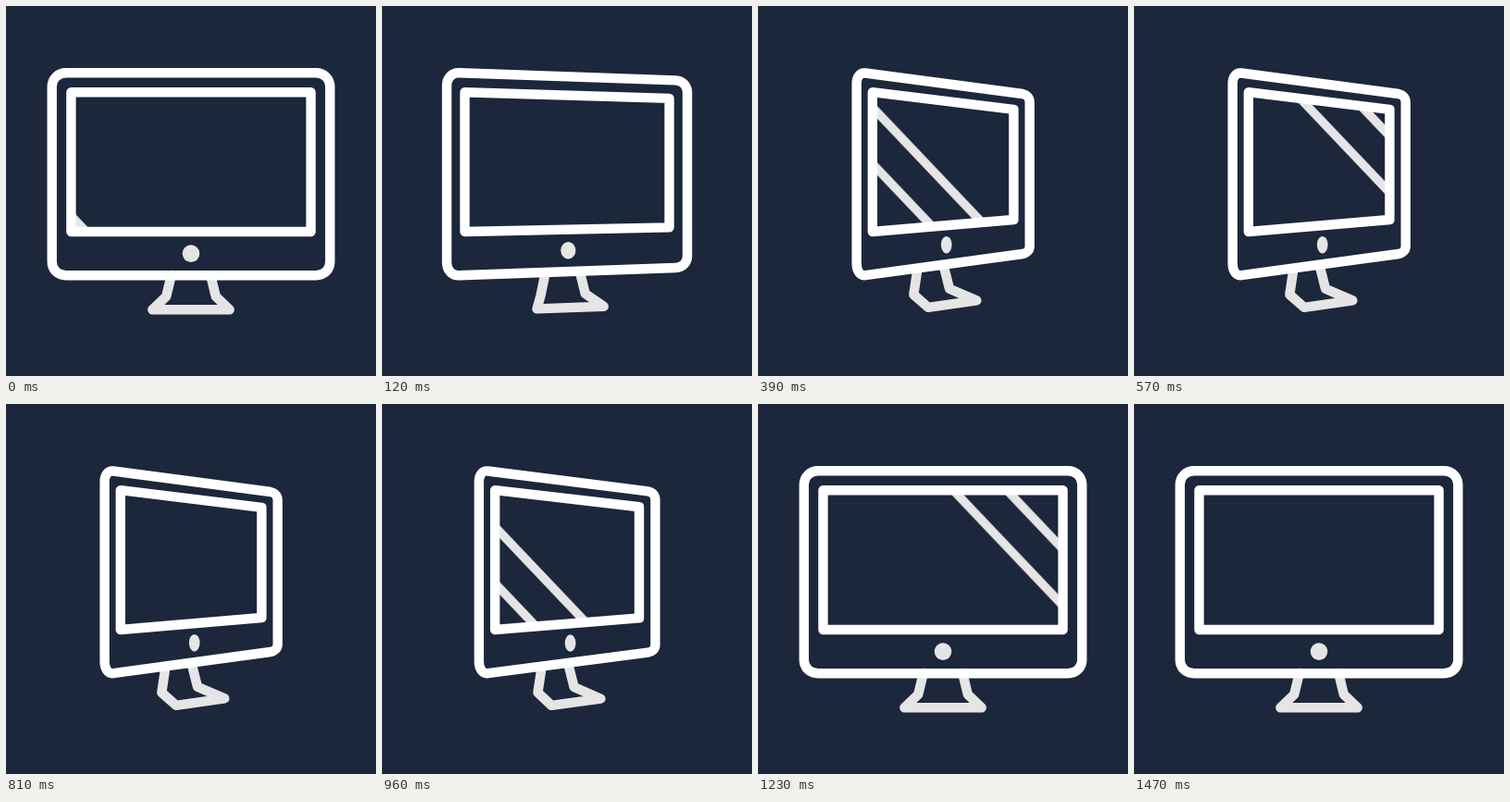
An HTML page that plays this animation: 400x400 px, repeating every 1.62 s.

```html
<!DOCTYPE html>
<html lang="en">
<head>
<meta charset="utf-8">
<title>Turning monitor</title>
<style>
  html, body { margin: 0; width: 100%; height: 100%; overflow: hidden; background: #1c273b; }
  svg { display: block; width: 100%; height: 100%; }

  .morph { d: var(--front); animation: turn 1620ms infinite; }
  .line { fill: none; stroke-width: 10.4; stroke-linejoin: round; stroke-linecap: round; }
  .white { stroke: #fff; }
  .grey { stroke: #e5e5e5; }
  .dot { fill: #e5e5e5; }
  .glare { stroke-width: 9.5; animation: sweep 1620ms linear infinite; }

  .case {
    --front: path("M49.7 87 C49.7 79 56 72.2 65 72.2 L335 72.2 C344 72.2 350.3 79 350.3 87 L350.3 276.5 C350.3 285 344 291.3 335 291.3 L65 291.3 C56 291.3 49.7 285 49.7 276.5 Z");
    --side: path("M106.6 84 C106.6 77 110 71.7 116 72.5 L286 95 C290.5 95.8 293.7 99.5 293.7 104 L293.7 260 C293.7 264 290.5 267.3 286 268 L116 291.2 C110 291.8 106.6 286 106.6 278.5 Z");
  }
  .screen {
    --front: path("M70.4 93.2 L329.6 93.2 L329.6 244 L70.4 244 Z");
    --side: path("M123.8 93.2 L276.4 111.8 L276.4 231 L123.8 244 Z");
  }
  .stand {
    --front: path("M178.8 291 L173.2 314 L158.3 328.3 L241.7 328.3 L226.8 314 L221.2 291");
    --side: path("M172 287 L168.3 312 L184 325.8 L236.3 318.4 L207 305.8 L201.5 284");
  }
  .dot {
    --front: path("M190.7 267.6 a9.3 9.3 0 1 0 18.6 0 a9.3 9.3 0 1 0 -18.6 0 Z");
    --side: path("M197.9 258.2 a5.8 9.3 0 1 0 11.6 0 a5.8 9.3 0 1 0 -11.6 0 Z");
  }

  @keyframes turn {
    0% { d: var(--front); animation-timing-function: cubic-bezier(.33, 0, .67, 1); }
    18.52% { d: var(--side); animation-timing-function: linear; }
    57.78% { d: var(--side); animation-timing-function: cubic-bezier(.33, 0, .67, 1); }
    72.59%, 100% { d: var(--front); }
  }
  /* two passes of the glare, left to right */
  @keyframes sweep {
    0%, 9.26% { transform: translateX(-52px); }
    46.91% { transform: translateX(365px); }
    46.92%, 49.38% { transform: translateX(-21px); }
    90.74%, 100% { transform: translateX(437px); }
  }
</style>
</head>
<body>
<svg viewBox="0 0 400 400">
  <clipPath id="glass"><path class="morph screen"/></clipPath>
  <path class="morph line grey stand"/>
  <g clip-path="url(#glass)">
    <path class="line grey glare" d="M-19 78 L152 258 M-77 78 L94 258"/>
  </g>
  <path class="morph line white case"/>
  <path class="morph line white screen"/>
  <path class="morph dot"/>
</svg>
</body>
</html>
```
